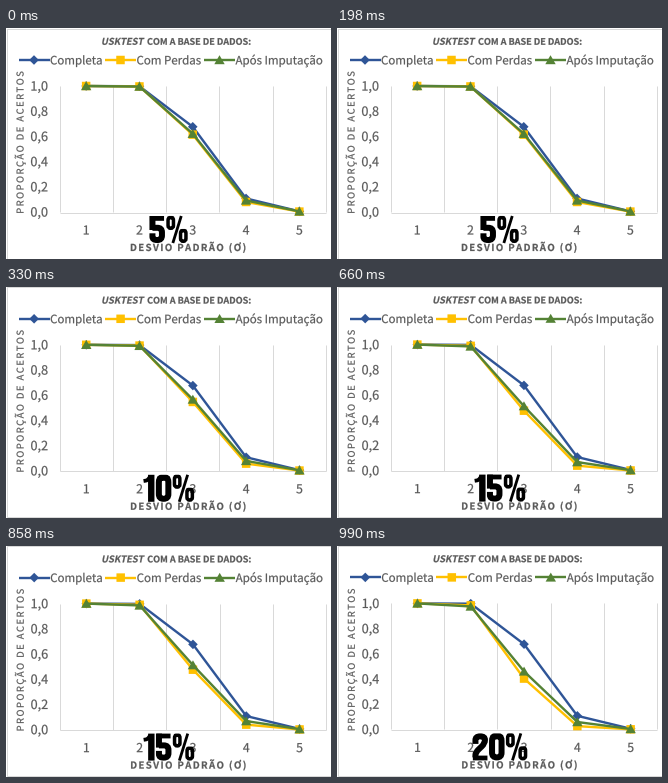
A matplotlib script that plays this animation: 325 by 231 pixels, repeating every 1320 ms.

```python
import math

import matplotlib.pyplot as plt
from matplotlib.animation import FuncAnimation
from matplotlib.patches import PathPatch, RegularPolygon
from matplotlib.path import Path
from matplotlib.textpath import TextPath
from matplotlib.transforms import Affine2D

W, H, DPI = 325, 231, 100
PX = 72 / DPI
GRAY, GRID, BLACK = "#595959", "#d9d9d9", "#000000"
BLUE, YELLOW, GREEN = "#2f5597", "#ffc000", "#548235"
FONTS = ["Noto Sans CJK JP", "Liberation Sans"]

LEFT, STEP, TOP, BASE = 53.5, 53.3, 58, 184
LEVELS = range(1, 6)
SIDES = {"diamond": (4, 4.8, 0), "square": (4, 6, math.pi / 4),
         "triangle": (3, 6, 0)}

fig = plt.figure(figsize=(W / DPI, H / DPI), dpi=DPI, facecolor="white")
ax = fig.add_axes([0, 0, 1, 1])


def accuracy(level, mid, slope):
    """Falling psychometric curve, normal in log level."""
    return (1 + math.erf(slope * math.log(mid / level) / math.sqrt(2))) / 2


def column(level):
    return LEFT + STEP * (level - .5)


def row(value):
    return BASE - (BASE - TOP) * value


def advance(s, size, prop):
    """Pen travel over s, trailing spaces included."""
    end = TextPath((0, 0), s + "|", size=size, prop=prop).get_extents().x1
    return end - TextPath((0, 0), "|", size=size, prop=prop).get_extents().x1


def text(s, x, y, size, weight="normal", align=0, track=0, angle=0, slant=0):
    prop = {"family": FONTS, "weight": weight}
    runs = list(s) if track else [s]
    pens, pen = [], 0
    for run in runs:
        pens.append(pen)
        pen += advance(run, size, prop) + track
    start = -align * (pen - track)
    place = (Affine2D().skew(slant, 0).rotate_deg(angle).scale(1, -1)
             .translate(x, y) + ax.transData)
    for run, p in zip(runs, pens):
        if run.strip():
            glyphs = TextPath((start + p, 0), run, size=size, prop=prop)
            ax.add_patch(PathPatch(glyphs, fc=GRAY, ec=GRAY, lw=.2 * PX,
                                   transform=place, snap=False, zorder=3))


def line(xs, ys, color, width=1, z=1):
    ax.plot(xs, ys, color=color, lw=width * PX, zorder=z,
            solid_capstyle="butt", solid_joinstyle="round")


def marker(kind, x, y, color, z):
    sides, radius, turn = SIDES[kind]
    # the y axis points down, so flip to stand triangles upright
    flip = Affine2D().scale(1, -1).translate(x, y) + ax.transData
    drop = radius * .2 if kind == "triangle" else 0
    ax.add_patch(RegularPolygon((0, -drop), sides, radius=radius,
                                orientation=turn, fc=color, lw=0,
                                transform=flip, snap=False, zorder=z))


def series(mid, slope, color, kind, z):
    xs = [column(n) for n in LEVELS]
    ys = [row(accuracy(n, mid, slope)) for n in LEVELS]
    line(xs, ys, color, 2.4, z)
    for x, y in zip(xs, ys):
        marker(kind, x, y, color, z + .1)


def bend(pts, r):
    """Polyline with rounded inner corners."""
    verts, codes = [pts[0]], [Path.MOVETO]

    def toward(a, b):
        d = math.dist(a, b)
        k = min(r, d / 2) / d
        return a[0] + (b[0] - a[0]) * k, a[1] + (b[1] - a[1]) * k

    for a, p, b in zip(pts, pts[1:], pts[2:]):
        verts += [toward(p, a), p, toward(p, b)]
        codes += [Path.LINETO, Path.CURVE3, Path.CURVE3]
    return Path(verts + [pts[-1]], codes + [Path.LINETO])


def ring(x, y, w, h):
    """Center line of an upright slot, starting mid-top."""
    mid = x + w / 2
    return [(mid, y), (x + w, y), (x + w, y + h), (x, y + h), (x, y), (mid, y)]


def heavy(ch):
    """Advance and strokes (points, width, corner radius) of a bold figure."""
    h, pen, bar = 27, 6, 4.8
    l, r, t, b = pen / 2, 12.5, pen / 2, h - pen / 2
    if ch == "0":
        return 16.8, [(ring(l, t, r - l, b - t), pen, 4.7)]
    if ch == "1":
        return 12.6, [([(8, 0), (8, h)], 6.4, 0),
                      ([(.3, 6.2), (4, 5.6), (7, 1.8)], 3.8, 1.5)]
    if ch == "2":
        hook = [(l, 10.5), (l, t), (r, t), (r, 10), (l, 19), (l, b)]
        return 16.6, [(hook, pen, 4.5), ([(.4, 24.6), (15, 24.6)], bar, 0)]
    if ch == "5":
        bowl = [(l, 11.8), (r, 11.8), (r, b), (l, b), (l, 17.3)]
        return 16.8, [([(.5, 2.4), (14.6, 2.4)], bar, 0),
                      ([(l, 0), (l, 14)], pen, 0), (bowl, pen, 4.5)]
    return 21.5, [(ring(1.8, 1.7, 5.4, 10.6), 3.5, 2.7),
                  (ring(14.3, 14.7, 5.4, 10.6), 3.5, 2.7),
                  ([(15, 0), (6.6, h)], 2.8, 0)]


def percent(s, center, top):
    figures = [heavy(ch) for ch in s]
    x = center - sum(step for step, _ in figures) / 2
    for step, strokes in figures:
        for pts, width, r in strokes:
            path = bend([(x + a, top + b) for a, b in pts], r)
            ax.add_patch(PathPatch(path, fc="none", ec=BLACK, lw=width * PX,
                                   capstyle="butt", joinstyle="miter",
                                   snap=False, zorder=9))
        x += step


def grid():
    for n in range(6):
        x = LEFT + STEP * n
        line([x, x], [TOP, BASE], GRID)
    line([LEFT, LEFT + 5 * STEP], [BASE + .5] * 2, GRID)


def labels():
    text("USKTEST", 95, 16.8, 9.3, "bold", slant=.2)
    text("COM A BASE DE DADOS:", 141, 16.8, 9.05, "bold")
    for k in range(6):
        text(f"{k / 5:.1f}".replace(".", ","), 42, row(k / 5) + 4.6, 12.7,
             align=1)
    for n in LEVELS:
        text(str(n), column(n), 206.5, 12.3, align=.5)
    text("DESVIO PADRÃO (Ơ)", 124, 223, 9.6, "bold", track=1.4)
    text("PROPORÇÃO DE ACERTOS", 17.5, 114.5, 9.4, align=.5, track=1.5,
         angle=90)


def legend():
    for name, x, color, kind in [("Completa", 12.5, BLUE, "diamond"),
                                 ("Com Perdas", 99, YELLOW, "square"),
                                 ("Após Imputação", 198, GREEN, "triangle")]:
        line([x, x + 31], [32, 32], color, 2.4, 4)
        marker(kind, x + 15.5, 32, color, 5)
        text(name, x + 31.5, 36.4, 11.5)


def draw(i):
    ax.clear()
    ax.axis("off")
    # the chart creeps slightly as the loss grows
    dx, dy = .1 * i, -.2 * i
    ax.set_xlim(-dx, W - dx)
    ax.set_ylim(H - dy, -dy)
    line([.5, W - .5, W - .5, .5, .5], [.5, .5, H - .5, H - .5, .5], GRID)
    grid()
    labels()
    legend()

    loss = i + 1
    series(3.242, 5.9, BLUE, "diamond", 5)
    series(3.242 - .091 * loss, 5.9, YELLOW, "square", 6)
    series(3.242 - .075 * loss, 5.9 - .2 * loss, GREEN, "triangle", 7)
    percent(f"{5 * loss}%", 162.6, 188)
    return []


anim = FuncAnimation(fig, draw, frames=4, interval=330,
                     init_func=lambda: draw(0), repeat=True, repeat_delay=0,
                     blit=False)
plt.show()
```
